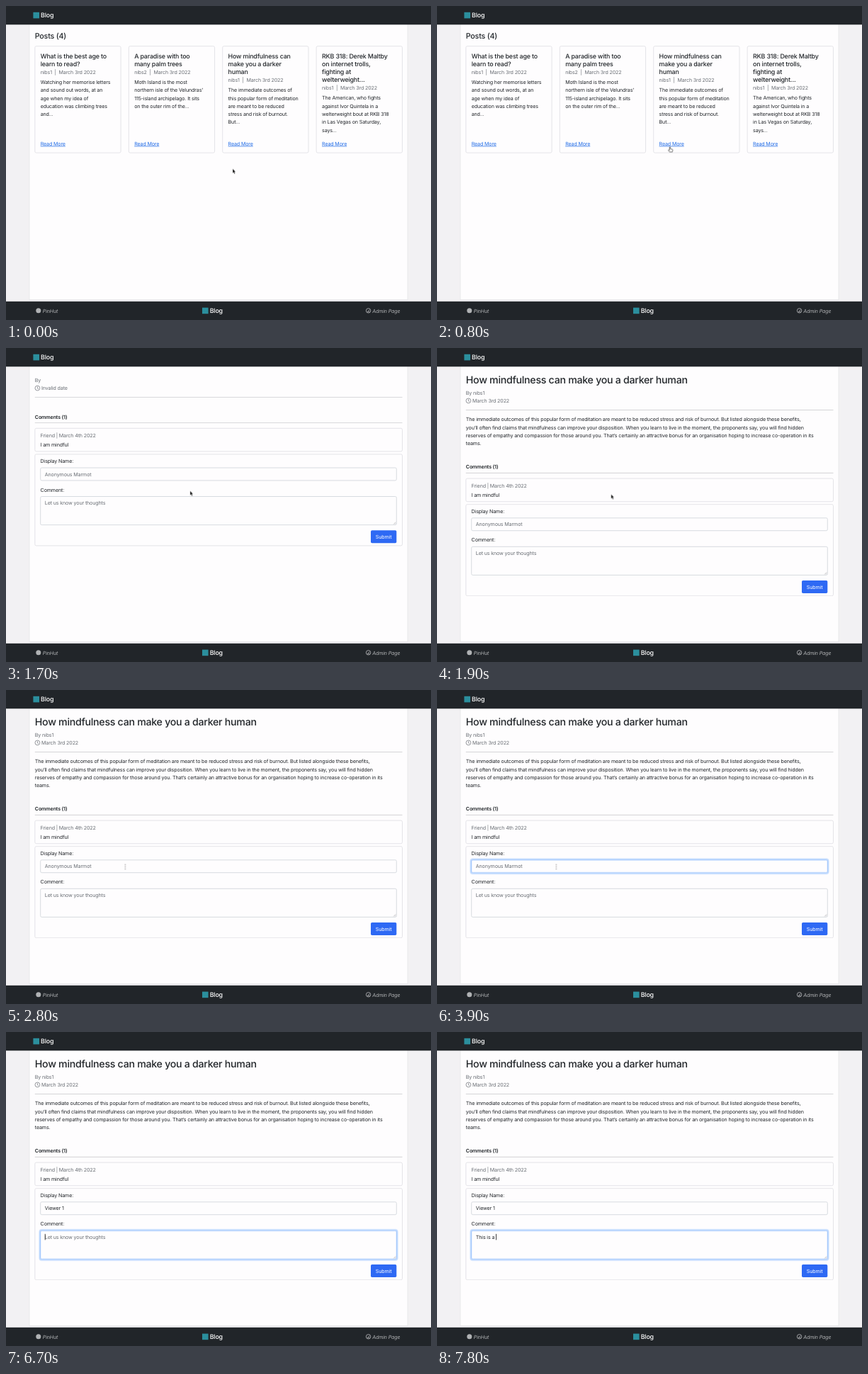
Animation, 600 px wide and 443 px high, one loop 8 s. Source, as an HTML page:

```html
<!DOCTYPE html>
<html lang="en">
<head>
<meta charset="utf-8">
<title>Blog</title>
<style>
html, body { margin: 0; width: 100%; height: 100%; overflow: hidden; background: #f2f1f3; }
svg { display: block; width: 600px; height: 443px; }
text {
  font: 400 7.12px Inter, "Liberation Sans", sans-serif;
  letter-spacing: -.02em; fill: #212529; white-space: pre;
  text-rendering: geometricPrecision;
}
.brand { font-size: 8.9px; font-weight: 500; fill: #fff; }
.foot { font-style: italic; fill: #b0b2b4; }
.h2 { font-size: 14.2px; font-weight: 500; }
.h4 { font-size: 10.7px; font-weight: 500; }
.h5 { font-size: 8.9px; font-weight: 500; }
.strong { font-weight: 600; }
.muted { fill: #696e74; }
.link { fill: #1f6be6; text-decoration: underline; }
.mid { text-anchor: middle; fill: #fff; }
.box { fill: none; stroke: #dddee2; stroke-width: .8; }
.field { fill: #fefdfe; stroke: #cdd2d8; stroke-width: .8; }
.field.on { stroke: #86b7fe; }
.glow { fill: none; stroke: #c2dbfe; stroke-width: 1.9; }
.rule { stroke: #c9cacd; stroke-width: .8; }
.icon { fill: none; stroke: #696e74; stroke-width: .7; }

.step { animation: 8s step-end infinite; }
#list { animation-name: list; }
#post { animation-name: post; }
#loading { animation-name: loading; }
#loaded { animation-name: loaded; }
#none { animation-name: none0; }
#one { animation-name: one; }
#thread { animation-name: thread; }
#form { animation-name: form; }
#arrow { animation-name: arrow; }
#hand { animation-name: hand; }
#beam { animation-name: beam; }
#cursor { animation: move 8s linear infinite; }
#nameRing { animation: nameRing 8s linear infinite; }
#noteRing { animation: noteRing 8s linear infinite; }

@keyframes list { 0% { visibility: visible } 12.3%, to { visibility: hidden } }
@keyframes post { 0% { visibility: hidden } 12.3%, to { visibility: visible } }
@keyframes loading { 0% { opacity: 1 } 23.6%, to { opacity: 0 } }
@keyframes loaded { 0% { opacity: 0 } 23.6%, to { opacity: 1 } }
@keyframes none0 { 0% { opacity: 1 } 16.1%, to { opacity: 0 } }
@keyframes one { 0% { opacity: 0 } 16.1%, to { opacity: 1 } }
@keyframes thread { 0% { transform: none } 23.6%, to { transform: translateY(70.8px) } }
@keyframes form { 0% { transform: none } 16.1%, to { transform: translateY(36.6px) } }
@keyframes arrow { 0% { opacity: 1 } 9.8% { opacity: 0 } 16.6% { opacity: 1 } 32.3%, to { opacity: 0 } }
@keyframes hand { 0% { opacity: 0 } 9.8% { opacity: 1 } 16.6%, to { opacity: 0 } }
@keyframes beam { 0% { opacity: 0 } 32.3% { opacity: 1 } 49.8%, to { opacity: 0 } }
@keyframes move {
  0%, 1% { transform: translate(320px, 229.6px); animation-timing-function: ease-in-out }
  11.2%, 16% { transform: translate(329px, 197.6px); animation-timing-function: ease-in-out }
  21.2% { transform: translate(260.2px, 201.4px) }
  26.2% { transform: translate(232px, 211px); animation-timing-function: ease-out }
  34.8%, to { transform: translate(168.3px, 249.5px) }
}
@keyframes nameRing { 0%, 37.3% { opacity: 0 } 38.8%, 71.4% { opacity: 1 } 73.2%, to { opacity: 0 } }
@keyframes noteRing { 0%, 71.4% { opacity: 0 } 73.2%, to { opacity: 1 } }
</style>
</head>
<body>
<svg viewBox="0 0 600 443">
  <rect width="600" height="443" fill="#f2f1f3"/>
  <rect x="33" y="20" width="534" height="394.5" fill="#fefdfe" stroke="#e6e5e9" stroke-width=".8"/>
  <rect width="600" height="26.3" fill="#212529"/>
  <rect y="416.8" width="600" height="27" fill="#212529"/>
  <rect x="38.4" y="8.8" width="8.6" height="8.6" fill="#2b8f9d"/>
  <text class="brand" x="49" y="16.4">Blog</text>
  <rect x="277" y="425.6" width="8.6" height="8.6" fill="#2b8f9d"/>
  <text class="brand" x="287.7" y="433.1">Blog</text>
  <circle cx="45.8" cy="429.8" r="3.5" fill="#b0b2b4"/>
  <text class="foot" x="51.8" y="432.5">PinHut</text>
  <g fill="none" stroke="#b0b2b4" stroke-width=".9">
    <circle cx="511.6" cy="429.8" r="3.2"/>
    <path d="M511.6 430.6l1.3-2M510 431.2h3.2"/>
  </g>
  <text class="foot" x="517.2" y="432.5">Admin Page</text>

  <g id="list" class="step"><text class="h4" x="40.8" y="46.2">Posts (4)</text></g>

  <g id="post" class="step">
    <g id="loading" class="step">
      <text class="muted" x="40.8" y="47.8">By</text>
      <g class="icon"><circle cx="44.4" cy="56.6" r="3.4"/><path d="M44.4 54.4v2.4l1.6.9"/></g>
      <text class="muted" x="50" y="59.2">Invalid date</text>
      <path class="rule" d="M40.8 69.6H559.5"/>
    </g>
    <g id="loaded" class="step">
      <text class="h2" x="40.8" y="50.2">How mindfulness can make you a darker human</text>
      <text class="muted" x="40.8" y="65.7">By nibs1</text>
      <g class="icon"><circle cx="44.4" cy="74.4" r="3.4"/><path d="M44.4 72.2v2.4l1.6.9"/></g>
      <text class="muted" x="50" y="77">March 3rd 2022</text>
      <path class="rule" d="M40.8 87.5H559.5"/>
      <text x="40.8" y="103.4">The immediate outcomes of this popular form of meditation are meant to be reduced stress and risk of burnout. But listed alongside these benefits,</text>
      <text x="40.8" y="114.7">you’ll often find claims that mindfulness can improve your disposition. When you learn to live in the moment, the proponents say, you will find hidden</text>
      <text x="40.8" y="125.9">reserves of empathy and compassion for those around you. That’s certainly an attractive bonus for an organisation hoping to increase co-operation in its</text>
      <text x="40.8" y="137.2">teams.</text>
    </g>
    <g id="thread" class="step">
      <text id="none" class="strong step" x="40.8" y="99.5">Comments (0)</text>
      <path class="rule" d="M40.8 105.6H559.5"/>
      <g id="one" class="step">
        <text class="strong" x="40.8" y="99.5">Comments (1)</text>
        <rect class="box" x="40.8" y="113.3" width="518.7" height="32.6" rx="2"/>
        <text class="muted" x="48.6" y="125.8">Friend | March 4th 2022</text>
        <text x="48.6" y="138.8">I am mindful</text>
      </g>
      <g id="form" class="step">
        <rect class="box" x="40.8" y="113.3" width="518.7" height="129" rx="2"/>
        <text x="48.6" y="125.7">Display Name:</text>
        <rect class="field" x="48.7" y="132.4" width="502.6" height="17.9" rx="1.8"/>
        <g id="nameRing">
          <rect class="glow" x="47.5" y="131.2" width="505" height="20.3" rx="2.8"/>
          <rect class="field on" x="48.7" y="132.4" width="502.6" height="17.9" rx="1.8"/>
        </g>
        <text id="name" x="54.8" y="144.1"></text>
        <text x="48.6" y="166.1">Comment:</text>
        <rect class="field" x="48.7" y="172.9" width="502.6" height="40.1" rx="1.8"/>
        <g id="noteRing">
          <rect class="glow" x="47.5" y="171.7" width="505" height="42.5" rx="2.8"/>
          <rect class="field on" x="48.7" y="172.9" width="502.6" height="40.1" rx="1.8"/>
        </g>
        <path d="M547.2 212l3-3M549 212l1.3-1.3" stroke="#8b8d90" stroke-width=".5"/>
        <text id="note" x="54.8" y="184.5"></text>
        <rect id="caret" width=".8" height="8.6" fill="#111"/>
        <rect x="515" y="220.6" width="36.3" height="18" rx="1.8" fill="#2e69f4"/>
        <text class="mid" x="533.1" y="232.3">Submit</text>
      </g>
    </g>
  </g>

  <g id="cursor">
    <path id="arrow" class="step" d="M0 0V6.2L1.4 5 2.4 7.2 3.5 6.7 2.5 4.6H4.4Z" fill="#111" stroke="#fff" stroke-width=".4"/>
    <path id="hand" class="step" d="M-.6 .6Q.1-.2.7.6V3L3.4 3.7Q4.2 4 4 5L3.4 7.4H-.5L-2.3 4.9Q-2 3.9-.6 4.8Z" fill="#fff" stroke="#333" stroke-width=".7"/>
    <path id="beam" class="step" d="M-.5-3h1.1M-.5 0h1.1M-.5 3h1.1" stroke="#555"/>
  </g>
</svg>
<script>
const $ = id => document.getElementById(id);
const LOOP = 8000, BLINK = 500, LEAD = 20;

const cards = [
  { title: ["What is the best age to", "learn to read?"], by: "nibs1",
    body: ["Watching her memorise letters", "and sound out words, at an", "age when my idea of", "education was climbing trees", "and..."] },
  { title: ["A paradise with too", "many palm trees"], by: "nibs2",
    body: ["Moth Island is the most", "northern isle of the Velundras’", "115-island archipelago. It sits", "on the outer rim of the..."] },
  { title: ["How mindfulness can", "make you a darker", "human"], by: "nibs1",
    body: ["The immediate outcomes of", "this popular form of meditation", "are meant to be reduced", "stress and risk of burnout.", "But..."] },
  { title: ["RKB 318: Derek Maltby", "on internet trolls,", "fighting at", "welterweight..."], by: "nibs1",
    body: ["The American, who fights", "against Ivor Quintela in a", "welterweight bout at RKB 318", "in Las Vegas on Saturday,", "says..."] }
];

const line = (x, y, str, cls = "") => `<text class="${cls}" x="${x}" y="${y}">${str}</text>`;

function card({ title, by, body }, i) {
  const left = 40.8 + i * 132.45, x = left + 7.9;
  const meta = 73.6 + title.length * 11.2;
  return `<rect class="box" x="${left}" y="56.7" width="121.3" height="150.4" rx="2"/>` +
    title.map((s, n) => line(x, 73.6 + n * 11.2, s, "h5")).join("") +
    line(x, meta, `${by}  |  March 3rd 2022`, "muted") +
    body.map((s, n) => line(x, meta + 14 + n * 11.3, s)).join("") +
    line(x, 196.6, "Read More", "link");
}
$("list").insertAdjacentHTML("beforeend", cards.map(card).join(""));

// keys: the time each character is typed
const fields = [
  { el: $("name"), hint: "Anonymous Marmot", text: "Viewer 1", focus: 3000, blur: 5700, top: 137,
    keys: [4000, 4200, 4400, 4500, 4700, 4800, 4900, 5300] },
  { el: $("note"), hint: "Let us know your thoughts", text: "This is a ", focus: 5700, blur: LOOP, top: 177.4,
    keys: [6800, 7000, 7100, 7200, 7400, 7500, 7600, 7600, 7700, 7800] }
];
const caret = $("caret");

function draw(t) {
  let lit = false;
  for (const f of fields) {
    const count = f.keys.filter(k => k <= t).length;
    f.el.textContent = count ? f.text.slice(0, count) : f.hint;
    f.el.classList.toggle("muted", !count);
    if (t < f.focus || t >= f.blur) continue;
    const since = t - (count ? f.keys[count - 1] : f.focus);
    lit = since % (2 * BLINK) < BLINK;
    caret.setAttribute("x", 54.8 + (count ? f.el.getComputedTextLength() : 0));
    caret.setAttribute("y", f.top);
  }
  caret.setAttribute("opacity", lit ? 1 : 0);
}

let start;
function tick(now) {
  start ??= now;
  draw(Math.min((now - start) % LOOP + LEAD, LOOP - 1));
  requestAnimationFrame(tick);
}
requestAnimationFrame(tick);
</script>
</body>
</html>
```
